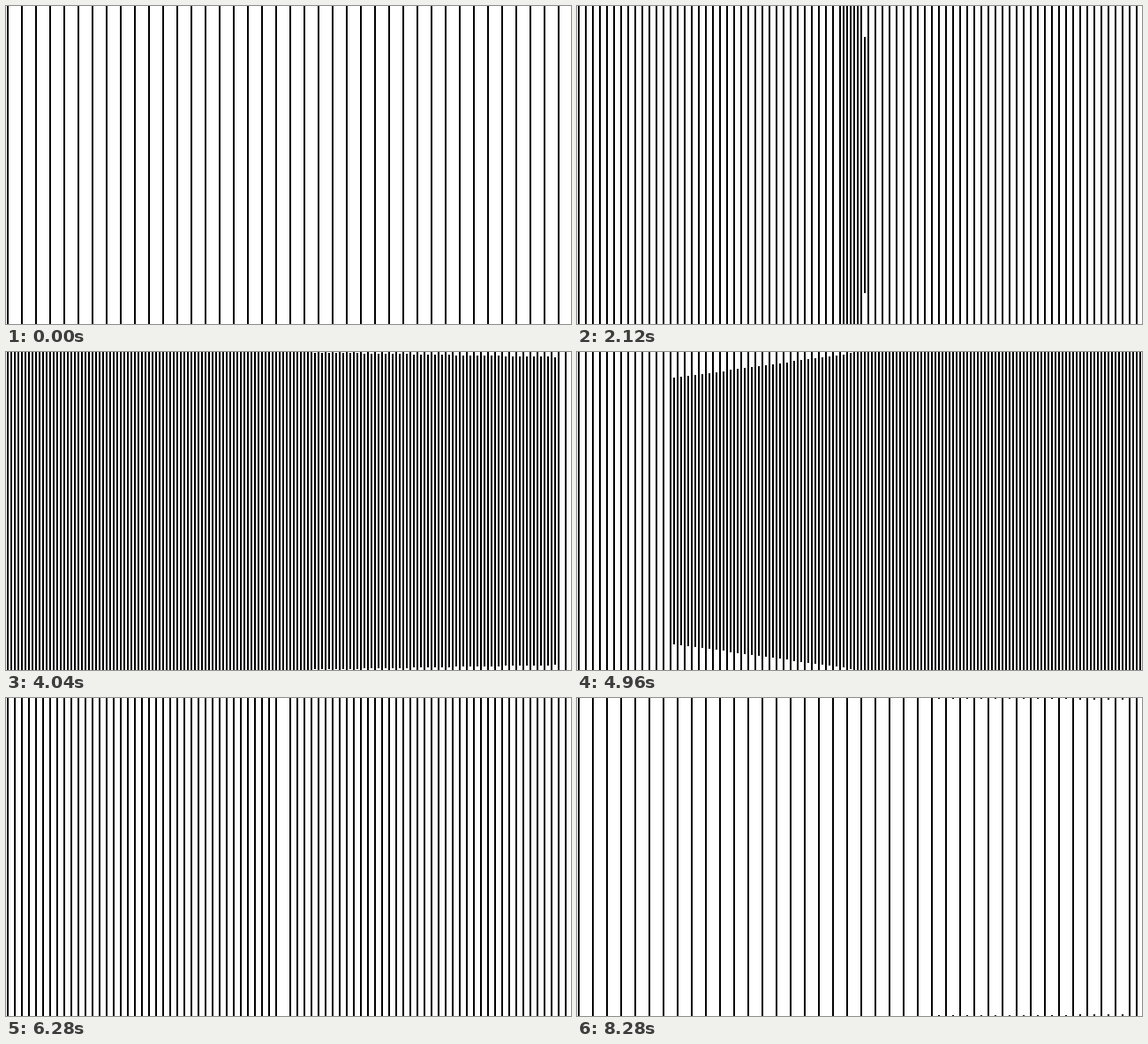
Animation of 640 by 360 pixels, one loop 8320 ms. Source, as an HTML page:

```html
<!DOCTYPE html>
<html lang="en">
<head>
<meta charset="utf-8">
<title>Turning stripes</title>
<style>
  html, body { margin: 0; width: 100%; height: 100%; overflow: hidden; background: #fff; }
  svg { display: block; width: 640px; height: 360px; }
  path { stroke: #000; stroke-width: 2; shape-rendering: crispEdges; }
</style>
</head>
<body>
<svg viewBox="0 0 640 360"><path id="lines"/></svg>
<script>
const LOOP = 8320, STEP = 40;
const WIDTH = 640, HEIGHT = 360;
const HALF = 321, DEPTH = 855, RISE = 174;
const path = document.getElementById('lines');

const segment = (x, top, bottom) => bottom > top ? `M${x} ${top}V${bottom}` : '';

// Projects a panel turning about a vertical axis; returns the covered top edge at x, or null.
function panelAt(phase, axis) {
  const s = Math.sin(phase), c = Math.cos(phase);
  const flat = Math.asin(Math.min(1, Math.abs(s)));
  const tilt = flat - 0.005 * Math.sin(flat) ** 4;
  const reach = HALF * Math.cos(tilt), z = HALF * Math.sin(tilt) / DEPTH;
  const far = reach / (1 + z), near = reach / (1 - z);
  const slope = RISE * Math.tan(tilt) / DEPTH;
  const farSide = s * c > 0 ? -1 : 1;
  return x => {
    const offset = (x - axis) * farSide;
    if (offset > far || -offset > near) return null;
    return Math.max(0, Math.round(slope * offset));
  };
}

function draw(time) {
  const phase = 2 * Math.PI * time / LOOP;
  const sparse = Math.cos(phase) > -1e-9;
  const panel = panelAt(phase, sparse ? 316.35 : 320);
  let d = '';

  // Lines that both the panel and the backdrop share.
  for (let x = 2; x < WIDTH; x += sparse ? 16 : 8) d += segment(x, 0, HEIGHT);

  if (sparse) {
    // The panel hides every second backdrop line.
    for (let x = 10; x < WIDTH; x += 16) {
      const top = panel(x);
      d += top === null
        ? segment(x, 0, HEIGHT)
        : segment(x, 0, top) + segment(x, HEIGHT - top, HEIGHT);
    }
  } else {
    // The panel adds a line in every gap.
    for (let x = 6; x < WIDTH; x += 8) {
      const top = panel(x);
      if (top !== null) d += segment(x, top, HEIGHT - top);
    }
  }
  path.setAttribute('d', d);
}

let start;
function tick(now) {
  start ??= now;
  const time = (now - start) % LOOP;
  draw(Math.floor(time / STEP + 1e-6) * STEP);
  requestAnimationFrame(tick);
}
draw(0);
requestAnimationFrame(tick);
</script>
</body>
</html>
```
